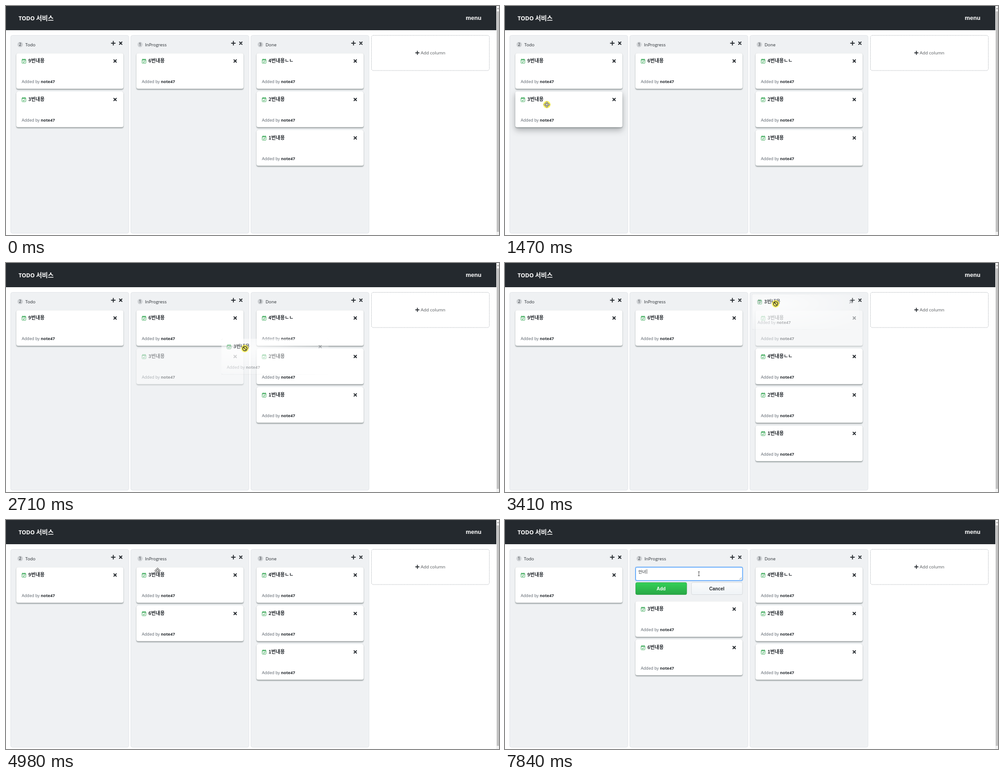
An HTML page that plays this animation: 1096 px wide and 511 px high, repeating every 7.99 s.

```html
<!DOCTYPE html>
<html lang="ko">
<head>
<meta charset="utf-8">
<title>TODO 서비스</title>
<style>
  html, body { margin: 0; width: 100%; height: 100%; overflow: hidden; background: #fff; }
  svg { display: block; width: 100%; height: 100%; }
  text { font: 9.75px "Open Sans", "Noto Sans", sans-serif; fill: #24292e; white-space: pre; }
  .brand { font-size: 12.4px; font-weight: 700; fill: #fff; }
  .ko { font: 600 10.8px "Noto Sans CJK KR", "Noto Sans CJK JP", "Noto Sans CJK SC", sans-serif; }
  .brand .ko { font-size: 14.1px; font-weight: 700; }
  .menu { font: 700 13.1px "Liberation Sans", Arial, sans-serif; fill: #fff; }
  .button { font: 700 10.3px "Liberation Sans", Arial, sans-serif; text-anchor: middle; }
  .note { font: 9.3px "Noto Sans Mono CJK KR", "Noto Sans CJK KR", "Noto Sans CJK JP", monospace; }
  .count { font-size: 8.6px; text-anchor: middle; }
  .author { font-size: 9.1px; fill: #586069; }
  .author tspan { font-weight: 700; fill: #24292e; }
  .column { fill: #eff1f3; stroke: #e1e4e8; }
  .card { fill: #fff; filter: drop-shadow(0 0 .6px rgba(27,40,40,.35)) drop-shadow(0 2px 1px rgba(40,55,55,.45)); }
  .hover { filter: drop-shadow(0 2px 1px rgba(40,55,55,.3)) drop-shadow(0 6px 7px rgba(27,31,35,.32)); }
  .ghost { -webkit-mask-image: radial-gradient(ellipse 250px 75px at 54px 22px, rgba(0,0,0,.75), transparent);
           mask-image: radial-gradient(ellipse 250px 75px at 54px 22px, rgba(0,0,0,.75), transparent); }
  .pointer { fill: #fff; stroke: #333; stroke-width: .9; stroke-linejoin: round; }
</style>
</head>
<body>
<svg id="stage" viewBox="0 0 1096 511" preserveAspectRatio="none">
  <defs>
    <path id="plus" d="M-4.2 0H4.2M0-4.2V4.2" fill="none" stroke-width="2" stroke-linecap="round"/>
    <path id="cross" d="M-2.7-2.7 2.7 2.7M2.7-2.7-2.7 2.7" fill="none" stroke="#24292e" stroke-width="2.1" stroke-linecap="round"/>
    <g id="calendar" fill="none" stroke="#3fab5c">
      <rect x=".5" y="2" width="8.6" height="8.6" rx="1"/>
      <path d="M.5 3.2H9.1M2.7 .2V3M6.9 .2V3" stroke-width="1.5"/>
      <path d="M2.6 7 4.2 8.5 7.1 5.6" stroke-width="1.2"/>
    </g>
    <linearGradient id="green" x2="0" y2="1"><stop stop-color="#34d058"/><stop offset="1" stop-color="#28a745"/></linearGradient>
    <linearGradient id="light" x2="0" y2="1"><stop stop-color="#fafbfc"/><stop offset="1" stop-color="#eff3f6"/></linearGradient>
  </defs>
  <g id="scene"></g>
</svg>
<script>
const DURATION = 7990, STEP = 76.8;
const CARD_W = 238, CARD_H = 79.5, PITCH = 85.8, FORM_H = 76;
const DRAG_START = 20, DRAG_END = 61, FORM_OPEN = 80, FOCUS = 89, READY = 90;
const GRAB = { x: 52, y: 22 };
const names = ["Todo", "InProgress", "Done"];
const moving = "3번내용";

// Pointer path: [step, x, y]
const path = [
  [1, 976, 496], [9, 493, 84], [10, 493, 84], [14, 89, 216], [16, 89, 217], [19, 93, 220],
  [20, 97, 220], [29, 350, 219], [31, 352, 219], [35, 531, 191], [39, 600, 168], [40, 600, 168],
  [45, 602, 72], [48, 602, 72], [53, 510, 108], [56, 395, 114], [60, 340, 113], [64, 337, 113],
  [69, 337, 113], [76, 507, 83], [83, 507, 83], [88, 431, 120]
];
// Where the moving card sits: [first step, column, row]
const slots = [[0, 0, 1], [27, 1, 1], [37, 2, 1], [42, 2, 0], [52, 1, 0]];
const typing = [[0, ""], [97, "ㅇ"], [98, "아"], [99, "안"], [101, "안ㄴ"], [102, "안녀"]];
const clicks = [[19, 60], [79, 81], [88, 89]];

const latest = (list, k) => list.filter(item => item[0] <= k).pop();
const columnX = i => 10.5 + 267 * i;
const text = (x, y, content, cls = "") => `<text x="${x}" y="${y}" class="${cls}">${content}</text>`;
const icon = (id, x, y, color = "#24292e") => `<use href="#${id}" x="${x}" y="${y}" stroke="${color}"/>`;
const rect = (x, y, w, h, attrs) => `<rect x="${x}" y="${y}" width="${w}" height="${h}" ${attrs}/>`;
const at = (x, y, content, attrs = "") => `<g transform="translate(${x} ${y})" ${attrs}>${content}</g>`;

function pointerAt(k) {
  const next = path.findIndex(p => p[0] > k);
  if (next < 1) return { x: path.at(-1)[1], y: path.at(-1)[2] };
  const [a, b] = [path[next - 1], path[next]];
  const f = (k - a[0]) / (b[0] - a[0]);
  return { x: a[1] + (b[1] - a[1]) * f, y: a[2] + (b[2] - a[2]) * f };
}

function cardBody(title, cls = "") {
  return rect(0, 0, CARD_W, CARD_H, `rx="4" class="card ${cls}"`) +
    `<use href="#calendar" x="12" y="12"/>` + text(26.5, 21, title, "ko") +
    icon("cross", 219.5, 17.5) + text(12, 67, "Added by <tspan>note47</tspan>", "author");
}

function frame() {
  return rect(0, 0, 1096, 511, 'fill="#fff"') + rect(0, 0, 1090, 54, 'fill="#24292e"') +
    text(28, 32, 'TODO <tspan class="ko">서비스</tspan>', "brand") + text(1022, 31, "menu", "menu") +
    rect(1090, 0, 6, 511, 'fill="#f1f1f1"') + rect(1091, 12, 5, 492, 'fill="#c1c1c1"') +
    '<path d="M1091.5 7 1094 4 1096 7Z" fill="#999"/>' +
    rect(812.5, 65.5, 262, 78.5, 'rx="4" fill="#fff" stroke="#a3a9ae" stroke-width=".9" stroke-dasharray="2 1.4"') +
    at(914.5, 104.5, '<use href="#plus" stroke="#24292e" transform="scale(.9)"/>') +
    `<g opacity=".8">${text(922, 108.2, "Add column")}</g>`;
}

function columnHead(i, count, plusHot) {
  const x = columnX(i), narrow = count === 1 ? .5 : 0;
  return rect(x, 65.5, 262.5, 441.5, 'rx="4" class="column"') +
    rect(x + 15, 80, 12 - 2 * narrow, 12, 'rx="6" fill="#cdd0d3"') +
    text(x + 21 - narrow, 89.2, count, "count") + text(x + 32.5 - 2 * narrow, 89.6, names[i]) +
    icon("plus", x + 228, 83, plusHot ? "#0366d6" : "#24292e") + icon("cross", x + 244.5, 83);
}

function form(k) {
  const focused = k >= FOCUS, ready = k >= READY, typed = latest(typing, k)[1];
  const border = focused ? "#2188ff" : "#d1d5da";
  return (focused ? rect(288.8, 103.8, 240.6, 33, 'rx="4" fill="#b3d1f3"') : "") +
    rect(290.5, 105.5, 237.5, 29.5, `rx="3" fill="#fff" stroke="${border}"`) +
    '<path d="M521 133 526 128M524 133 526 131" stroke="#777" stroke-width=".8"/>' +
    (ready ? text(296.5, 119, typed, "note") + rect(296.5 + typed.length * 9.2, 110, .8, 10, 'fill="#222"')
           : `<g opacity=".27">${text(295.5, 118.5, "Enter a note", "note")}</g>`) +
    rect(290.5, 139.5, 113.5, 27, `rx="3" fill="${ready ? "url(#green)" : "#94d3a2"}" stroke="${ready ? "#2a9b45" : "#82bf90"}" stroke-width=".8"`) +
    `<g style="opacity:${ready ? 1 : .75}"><text x="347" y="156.5" class="button" style="fill:#fff">Add</text></g>` +
    rect(414.5, 139.5, 113.5, 27, 'rx="3" fill="url(#light)" stroke="#cfd2d5" stroke-width=".8"') +
    text(471, 156.5, "Cancel", "button");
}

const arrow = '<path d="M0 0V9L2 7.2 3.5 10.4 4.9 9.7 3.4 6.6H6.2Z"/>';
const pointers = {
  arrow,
  copy: arrow + '<rect x="2.5" y="8" width="6" height="4.5"/>',
  move: '<path d="M0-6.5 2.5-4H1V-1H4V-2.5L6.5 0 4 2.5V1H1V4H2.5L0 6.5-2.5 4H-1V1H-4V2.5L-6.5 0-4-2.5V-1H-1V-4H-2.5Z"/>',
  block: '<g fill="none" stroke-width="1.5"><circle r="4.8"/><path d="M-3.3-3.3 3.3 3.3"/></g>',
  hand: '<path d="M-1.2 1Q0-.8 1.2 1V5.3L5 6.1Q6.4 6.5 6.2 8L5.4 13H-.4L-3.8 8.6Q-3.6 7-1.2 8.6Z"/>',
  beam: '<path d="M-2-4.5H2M0-4.5V4.5M-2 4.5H2" fill="none"/>'
};

function draw(k) {
  const p = pointerAt(k), dragging = k >= DRAG_START && k < DRAG_END;
  const open = k >= FORM_OPEN, [, slotColumn, slotRow] = latest(slots, k);
  const lists = [["9번내용"], ["6번내용"], ["4번내용ㄴㄴ", "2번내용", "1번내용"]];
  lists[slotColumn].splice(slotRow, 0, moving);
  const counts = k < 70 ? [2, 1, 3] : [1, 2, 3];
  const hoverReady = k >= 1 && !dragging && (k < DRAG_END || k > 69);

  let out = frame(), overCard = false, overPlus = false;
  lists.forEach((list, i) => {
    const x = columnX(i) + 12.5;
    const plusHot = k >= 1 && !dragging && Math.abs(p.x - columnX(i) - 228) < 6 && Math.abs(p.y - 83) < 7;
    overPlus ||= plusHot;
    out += columnHead(i, counts[i], plusHot);
    list.forEach((title, row) => {
      const y = 105.3 + row * PITCH + (open && i === 1 ? FORM_H : 0);
      const inside = p.x > x && p.x < x + CARD_W && p.y > y && p.y < y + CARD_H;
      overCard ||= inside;
      const faded = dragging && title === moving ? 'opacity=".45"' : "";
      out += at(x, y, cardBody(title, inside && hoverReady ? "hover" : ""), faded);
    });
  });
  if (open) out += form(k);
  if (dragging) out += at(p.x - GRAB.x, p.y - GRAB.y, `<g class="ghost">${cardBody(moving)}</g>`);
  if (k < 1) return out;

  if (clicks.some(([from, to]) => k >= from && k <= to))
    out += `<circle cx="${p.x}" cy="${p.y}" r="8.3" fill="#f8ee32" opacity=".75"/>`;
  const overNote = open && p.y > 105 && p.y < 135;
  const kind = dragging ? (overCard ? "copy" : "block")
    : overNote ? "beam" : overPlus ? "hand" : overCard ? "move" : "arrow";
  return out + at(p.x, p.y, pointers[kind], 'class="pointer"');
}

const scene = document.getElementById("scene");
let shown = -1;
function tick() {
  const k = Math.floor((performance.now() % DURATION + 10) / STEP);
  if (k !== shown) scene.innerHTML = draw(shown = k);
  requestAnimationFrame(tick);
}
tick();
</script>
</body>
</html>
```
